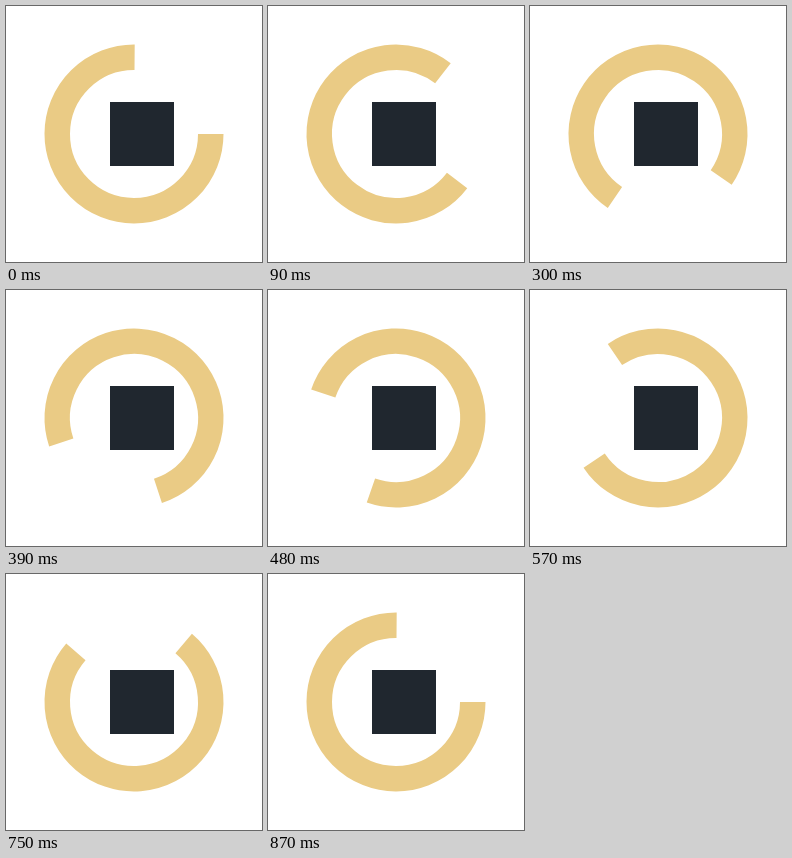
An HTML page that plays this animation: 256x256 px, repeating every 900 ms.

```html
<!DOCTYPE html>
<html lang="en">
<head>
<meta charset="utf-8">
<title>Loading ring</title>
<style>
  html, body { margin: 0; width: 100%; height: 100%; overflow: hidden; background: #fff; }
  svg { display: block; width: 100%; height: 100%; }
</style>
</head>
<body>
<svg viewBox="0 0 256 256">
  <rect x="104" y="96" width="64" height="64" fill="#20272f"/>
  <!-- just over three quarters of a circle, open at the top right -->
  <path id="ring" d="M204.75 128A76.75 76.75 0 1 1 128.6 51.25" fill="none" stroke="#eacb85" stroke-width="25.5"/>
</svg>
<script>
  const LOOP = 900, STEP = 30;
  const LAST = LOOP / STEP - 1;
  const ring = document.getElementById('ring');

  // The turn advances in even steps; the last step of the loop equals the first.
  function draw(ms) {
    const step = Math.floor((ms % LOOP) / STEP + 1e-6);
    const angle = step * 360 / LAST;
    ring.setAttribute('transform', `rotate(${angle} 128 128)`);
  }

  const start = performance.now();
  function tick() {
    draw(performance.now() - start);
    requestAnimationFrame(tick);
  }
  tick();
</script>
</body>
</html>
```
